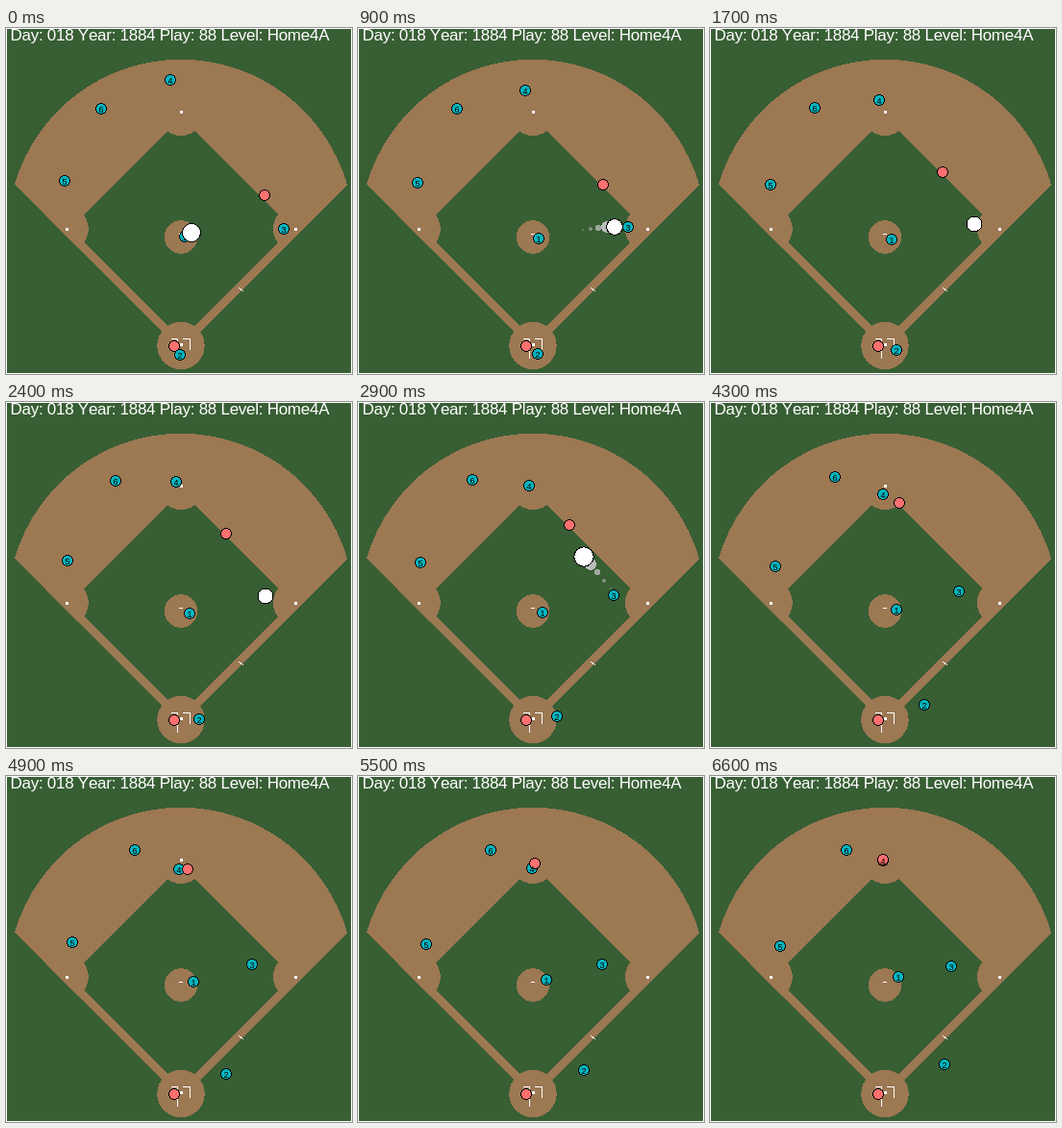
An HTML page that plays this animation: 360 px wide and 360 px high, repeating every 6.7 s.

```html
<!DOCTYPE html>
<html lang="en">
<head>
<meta charset="utf-8">
<title>Baseball play</title>
<style>
  html, body { margin: 0; width: 100%; height: 100%; overflow: hidden; background: #385e34; }
  svg { display: block; width: 360px; height: 360px; shape-rendering: crispEdges; }
  .dirt { fill: #9c7853; }
  .grass { fill: #385e34; }
  .chalk { fill: none; stroke: #fff; }
  .bag { fill: #fff; }
  .title { font: 17px "Liberation Sans", Arial, sans-serif; letter-spacing: -0.27px; fill: #fff; font-kerning: none; }
  .fielder { fill: #00b4be; stroke: #000; }
  .runner { fill: #ff7070; stroke: #000; }
  .ball { fill: #fff; stroke: #000; }
  .trail { fill: #c8c8c8; }
  .num { font: 9px "Liberation Sans", Arial, sans-serif; text-anchor: middle; fill: #000; }
</style>
</head>
<body>
<svg viewBox="0 0 360 360">
  <defs>
    <clipPath id="fair"><path id="wedge" d="M9 163A180 180 0 0 1 355 163L182 336Z"/></clipPath>
  </defs>
  <rect class="grass" width="360" height="360"/>
  <use href="#wedge" class="dirt"/>
  <path class="grass" d="M182 93L297.5 208.5 182 324 66.5 208.5Z"/>
  <g class="dirt">
    <g clip-path="url(#fair)">
      <circle cx="182" cy="87.5" r="24.5"/>
      <circle cx="61.5" cy="209" r="24.3"/>
      <circle cx="302.5" cy="209" r="24.5"/>
    </g>
    <circle cx="182" cy="217.5" r="17.3"/>
    <circle cx="182" cy="330.5" r="24.7"/>
  </g>
  <g class="bag">
    <rect x="181" y="86" width="3" height="3"/>
    <rect x="62" y="208" width="3" height="3"/>
    <rect x="300" y="208" width="3" height="3"/>
    <rect x="181" y="328" width="3" height="3"/>
  </g>
  <path class="chalk" d="M180 214.5h4M242 270l5 4M172 323.5h6.5V344M184 323.5h7.5V335"/>
  <rect class="chalk" x="0.5" y="0.5" width="359" height="359"/>
  <text class="title" x="4.5" y="13">Day: 018 Year: 1884 Play: 88 Level: Home4A</text>
  <g id="play"></g>
</svg>
<script>
const LOOP = 6700, STEP = 100, END = LOOP - STEP;
const CATCH = 1000, THROW = 2400, OUT = 3720;

// Each run is a cubic Bezier: start, two controls, end.
const runs = {
  1: [[186, 217], [190, 225], [196, 215], [196, 209]],
  2: [[181, 340], [192, 341], [230, 308], [244, 300]],
  3: [[289, 209], [268, 205], [256, 191], [251, 198]],
  4: [[171, 54], [178, 82], [182, 112], [180, 88]],
  5: [[61, 159], [63, 163], [68, 173], [73, 177]],
  6: [[99, 84], [107, 85], [138, 74], [142, 77]],
  runner: [[269, 174], [240, 152], [177, 84], [180, 87]]
};
const play = document.getElementById("play");

function set(el, attrs) {
  for (const key in attrs) el.setAttribute(key, attrs[key]);
}

function add(tag, cls, attrs = {}) {
  const el = document.createElementNS("http://www.w3.org/2000/svg", tag);
  set(el, { class: cls, ...attrs });
  return play.appendChild(el);
}

const mix = (a, b, u) => a.map((v, i) => v + (b[i] - v) * u);

function along(points, t) {
  const u = Math.min(t / END, 1);
  while (points.length > 1) points = points.slice(1).map((p, i) => mix(points[i], p, u));
  return points[0];
}

// Returns [x, y, radius], or null when the ball is out of play.
function ballAt(t) {
  if (t < 0 || t >= OUT) return null;
  if (t <= CATCH) {
    const u = t / CATCH;
    return [...mix([193, 213], [275, 206], u), 9.5 - 1.3 * u * u];
  }
  if (t < THROW) return [...along(runs[3], t), 8];
  const u = (t - THROW) / (OUT - THROW);
  return [...mix(along(runs[3], THROW), along(runs[4], OUT), u), 8 + 9 * u * (1 - u)];
}

const fielders = [1, 2, 3, 4, 5, 6].map(id => ({ id, dot: add("circle", "fielder", { r: 5.5 }) }));
add("circle", "runner", { cx: 175, cy: 331, r: 5.5 });
const runner = add("circle", "runner", { r: 5.5 });
for (const f of fielders) {
  f.label = add("text", "num");
  f.label.textContent = f.id;
}
const trail = [4, 3, 2, 1].map(n => ({
  lag: n * STEP,
  dot: add("circle", "trail", { r: 0.5 + 11 / 2 ** n, opacity: 1.1 - n / 5 })
}));
const ball = add("circle", "ball");

function place(el, spot) {
  el.style.display = spot ? "" : "none";
  if (spot) set(el, { cx: Math.round(spot[0]), cy: Math.round(spot[1]) });
}

function draw(t) {
  for (const f of fielders) {
    const [x, y] = along(runs[f.id], t).map(Math.round);
    place(f.dot, [x, y]);
    set(f.label, { x, y: y + 3.5 });
  }
  place(runner, along(runs.runner, t));
  const now = ballAt(t);
  place(ball, now);
  if (now) set(ball, { r: now[2] });
  for (const { lag, dot } of trail) place(dot, now && ballAt(t - lag));
}

const start = performance.now();
function tick() {
  const t = (performance.now() - start) % LOOP;
  draw(Math.floor(t / STEP) * STEP);
  requestAnimationFrame(tick);
}
tick();
</script>
</body>
</html>
```
